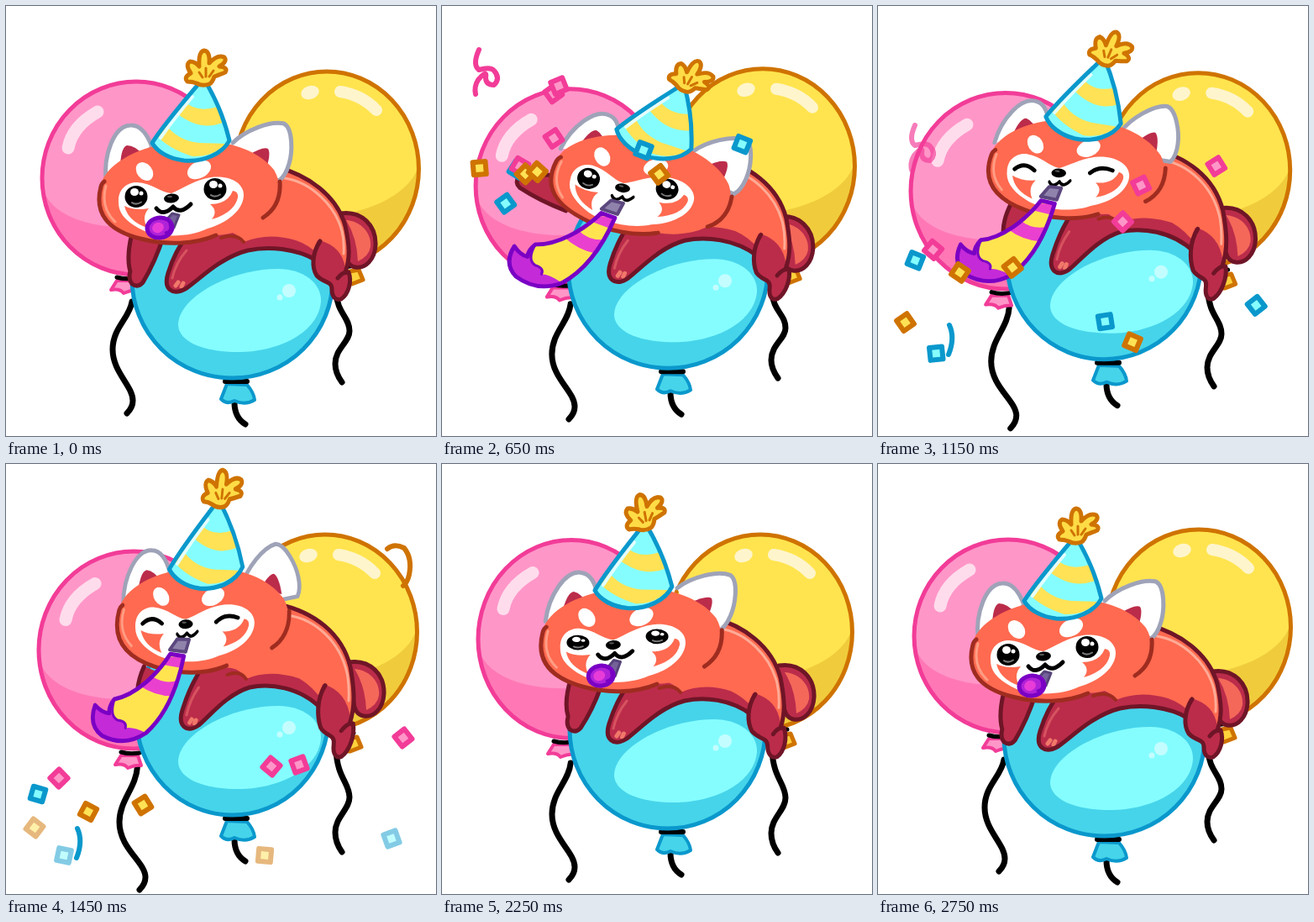
An HTML page for the animation above (2800 ms loop, 512 px wide and 512 px high).

```html
<!DOCTYPE html>
<html lang="en">
<head>
<meta charset="utf-8">
<title>Party panda</title>
<style>
html, body { margin: 0; width: 100%; height: 100%; overflow: hidden; background: #fff; }
svg { display: block; width: 100vw; height: 100vh; }
</style>
</head>
<body>
<svg id="stage" viewBox="0 0 512 512" fill="none" stroke-linecap="round" stroke-linejoin="round"></svg>
<script>
const LOOP = 2800, STEP = 50;
const stage = document.getElementById('stage');
const C = {
  orange: '#ff6a50', brown: '#9f2c20', dark: '#bb2c4a', maroon: '#6f1527',
  pink: '#ff96c8', pinkLine: '#f23c98', gold: '#ffe44f', goldLine: '#cf7300',
  blue: '#46d4ea', blueLine: '#0a98cc', ice: '#85fdff', grey: '#9fa3b8',
  violet: '#7a00c4', purple: '#b022d8'
};

const clamp = (v, a = 0, b = 1) => Math.min(b, Math.max(a, v));

// Monotone cubic through the keys
function curve(t, T, V) {
  const n = T.length - 1;
  if (t <= T[0]) return V[0];
  if (t >= T[n]) return V[n];
  let i = 0;
  while (t >= T[i + 1]) i++;
  const slope = k => (V[k + 1] - V[k]) / (T[k + 1] - T[k]);
  const tangent = k => {
    if (k === 0 || k === n) return 0;
    const a = slope(k - 1), b = slope(k);
    return a * b <= 0 ? 0 : 2 * a * b / (a + b);
  };
  const h = T[i + 1] - T[i], u = (t - T[i]) / h, u2 = u * u, u3 = u2 * u;
  return V[i] * (2 * u3 - 3 * u2 + 1) + tangent(i) * h * (u3 - 2 * u2 + u)
    + V[i + 1] * (3 * u2 - 2 * u3) + tangent(i + 1) * h * (u3 - u2);
}

const path = (d, fill, line, w = 5) =>
  `<path d="${d}" fill="${fill || 'none'}"${line ? ` stroke="${line}" stroke-width="${w}"` : ''}/>`;
const oval = (x, y, rx, ry, fill, turn = 0, line = '', w = 5) =>
  `<ellipse cx="${x}" cy="${y}" rx="${rx}" ry="${ry}" fill="${fill}" transform="rotate(${turn} ${x} ${y})"${line ? ` stroke="${line}" stroke-width="${w}"` : ''}/>`;
const group = (tf, s) => `<g transform="${tf}">${s}</g>`;
const move = (x, y, s) => group(`translate(${x} ${y})`, s);
const warp = (d, f) => d.replace(/(-?[\d.]+) (-?[\d.]+)/g, (m, x, y) => f(+x, +y).map(v => v.toFixed(2)).join(' '));

const KEYS = [0, 400, 850, 1450, 1850, 2250, 2750];
const POSE = [0, 400, 850, 1100, 1450, 1650, 1850, 2250, 2750];
const ARM = [0, 150, 400, 850, 1100, 1450, 1850, 2250, 2750];

function balloon(cx, cy, rx, ry, fill, shade, line, left, right) {
  const edge = y => rx * Math.sqrt(1 - (y / ry) ** 2);
  const x0 = cx - edge(left), x1 = cx + edge(right);
  const crescent = `M${x0} ${cy + left}A${rx} ${ry} 0 0 0 ${x1} ${cy + right}` +
    `C${cx + rx * .8} ${cy + 66} ${cx - rx * .8} ${cy + 82} ${x0} ${cy + left}Z`;
  return oval(cx, cy, rx, ry, fill) + path(crescent, shade) + oval(cx, cy, rx, ry, 'none', 0, line);
}

function pinkBalloon(at) {
  const cx = at(155, 153, 152, 152, 152, 154), cy = at(205, 209.5, 217.5, 221.5, 216, 208.5);
  const rx = at(112, 111, 113, 113, 111, 111), ry = at(115, 115, 116, 117.5, 118, 118);
  const kx = at(140, 139, 141, 145, 146, 141), ky = at(323, 326, 336, 343, 339, 330);
  const ex = at(0, 2, 11, 15, 12, 7), ey = at(0, 3, 11, 22, 20, 10), lx = at(0, 0, 7, 8, 8, 4);
  const string = `M${150 + lx * .8} ${352 + ey * .4}C${147 + lx} ${372 + ey * .6} ${127 + lx} ${383 + ey * .8} ${127 + lx} ${409 + ey * .8}` +
    `C${127 + lx} ${436 + ey} ${151 + ex} ${452 + ey} ${151 + ex} ${470 + ey}Q${151 + ex} ${478 + ey} ${144 + ex} ${485 + ey}`;
  return path(string, '', '#000', 7)
    + balloon(cx, cy, rx, ry, C.pink, '#ff78b5', C.pinkLine, 12, 12)
    + move(kx, ky, path('M-8 4L-15 15Q-4 13 0 19Q10 15 16 16L12 4Z', C.pink, C.pinkLine, 4) + path('M-8 0Q2 3 14 1', '', '#000', 5))
    + move(cx - 155, cy - 205, path('M74 169Q79 143 109 126', '', '#ffdcec', 15));
}

function yellowBalloon(at) {
  const cx = at(382, 382, 382, 380, 379, 379), cy = at(194, 190, 192, 200, 204, 200);
  const s = at(0, -6, -3, 14, 20, 15);
  const kx = at(414, 414, 416, 412, 408, 409), ky = at(322, 320, 322, 333, 337, 329);
  const string = `M393 340C394 ${366 + s * .5} 409 ${370 + s * .7} 409 ${387 + s * .7}` +
    `C409 ${400 + s * .8} 392 ${408 + s * .9} 392 ${426 + s * .9}Q392 ${437 + s} 400 ${448 + s}`;
  return path(string, '', '#000', 7)
    + balloon(cx, cy, 109.5, 116, C.gold, '#f0cc3c', C.goldLine, 10, -4)
    + move(kx, ky, path('M-10 -5L6 -8L11 4L-2 9L-13 9Z', '#ffd23c', C.goldLine) + path('M-12 -11L2 -13', '', '#000', 5))
    + move(cx - 382, cy - 194, oval(362, 103, 11, 8, '#fff5cc', -18) + path('M398 102Q424 106 441 124', '', '#fff5cc', 14));
}

function blueBalloon(at, b) {
  const left = at(148, 148, 149, 153, 151, 150), right = at(391, 391, 389, 386, 386, 387);
  const cx = (left + right) / 2, rx = (right - left) / 2 - 2;
  return move(0, b,
    path('M272 472Q272 490 285 498', '', '#000', 7)
    + path('M263 450L256 468Q263 475 272 470Q285 476 296 469Q295 460 287 451Z', C.blue, C.blueLine, 4)
    + path('M261 447H287', '', '#000', 6))
    + oval(cx, 325 + b, rx, 118, C.blue, 0, C.blueLine)
    + move(0, b, path('M205 379C206 346 268 313 324 313C354 313 376 330 375 352C372 388 326 412 276 412C236 412 205 400 205 379Z', C.ice)
      + oval(337, 339, 8, 8, '#c4fdff') + oval(326, 347, 3.5, 3.5, '#c4fdff'));
}

function tail(at) {
  const x = at(0, -6, 8, 10, -10, 3), y = at(0, 6, 1, -11, -2, -7);
  return move(x, y, path('M398 247C424 243 441 262 440 285C439 302 428 313 416 311C406 309 400 298 402 284Z', C.dark)
    + path('M405 255C422 256 436 270 434 287Q432 298 419 304Q418 276 405 255Z', '#f4685a')
    + path('M398 247C424 243 441 262 440 285C439 302 428 313 416 311C408 310 404 302 404 294', '', C.maroon));
}

function backArm(t) {
  const k = v => curve(t, ARM, v);
  const x = k([170, 168, 150, 158, 175, 182, 180, 172, 170]), y = k([270, 266, 226, 228, 240, 248, 250, 260, 270]);
  const tx = k([154, 150, 88, 95, 150, 162, 163, 156, 154]), ty = k([332, 325, 182, 242, 290, 298, 302, 317, 332]);
  const len = Math.hypot(tx - x, ty - y), a = Math.atan2(ty - y, tx - x) * 180 / Math.PI;
  return group(`translate(${x} ${y}) rotate(${a})`,
    path(`M0 -18Q${len * .5} -16 ${len - 5} -8Q${len + 3} -4 ${len} 4Q${len - 4} 10 ${len - 14} 10Q${len * .5} 20 0 19`, C.dark, C.maroon));
}

function body(at, b) {
  const ax = at(0, 3, 11, 17, 13, 6), bx = at(0, 3, 7, 6, 3, -1);
  const bend = (x, y) => {
    const side = clamp((x - 340) / 30), lift = 1 - side + side * clamp((352 - y) / 110);
    return [x + ax * clamp((300 - x) / 100) + bx * clamp((x - 300) / 60) * clamp((352 - y) / 40), y + b * lift];
  };
  const draw = (d, ...style) => path(warp(d, bend), ...style);
  const under = 'C345 288 312 286 288 291C256 299 232 324 215 336C198 346 187 337 193 318C198 302 204 288 222 264';
  return draw('M300 188C352 196 394 226 404 262C409 285 410 300 404 318L370 303' + under + 'Z', C.orange)
    + draw('M222 264L262 268Q276 270 283 281Q312 269 345 279Q360 284 372 296L370 303' + under + 'Z', C.dark)
    + draw('M256 276Q274 270 283 281', '', C.brown, 4)
    + draw('M198 324Q202 306 215 291', '', '#d6535f', 3)
    + draw('M202 333L205 329M209 334L211 330', '', '#f0786a', 5)
    + draw('M370 303' + under, '', C.maroon)
    + draw('M332 205C364 210 392 238 400 268Q403 280 402 295', '', '#ffab96', 3)
    + draw('M371 279C363 295 363 312 370 321C378 330 388 327 388 337C388 347 393 351 399 349C408 343 412 328 408 316L404 312Q400 286 373 279Z', C.dark)
    + draw('M322 192C360 201 394 226 404 262C409 285 410 300 404 317', '', C.maroon)
    + draw('M374 280C364 295 364 312 370 321C378 330 388 327 388 337C388 347 393 351 399 349C408 343 412 328 408 317Q401 316 395 324', '', C.maroon);
}

function eye(x, y, open) {
  if (open < .3) return '';
  const ry = 13 * open;
  return oval(x, y, 13.5, ry, '#000') + oval(x - 2, y - ry * .42, 5, 4.5 * open, '#fff')
    + oval(x + 6, y - ry * .3, 2.5, 2.5 * open, '#fff')
    + path(`M${x - 5} ${y + ry * .55}Q${x} ${y + ry * .8} ${x + 6} ${y + ry * .5}`, '', '#777', 2);
}

function face(t, ext) {
  const open = curve(t, [0, 600, 850, 1000, 2100, 2250, 2400], [1, 1, .82, 0, 0, .68, 1]);
  const shut = open < .3 ? path('M143 230Q154 219 167 229M235 225Q246 214 262 219', '', '#000') : '';
  const mouth = path('M179 241Q187 251 199 239Q207 249 220 236', '', '#000');
  return path('M134 234C133 218 144 210 156 210C174 211 184 222 197 223C210 218 224 207 244 204C268 201 284 212 283 226C282 244 262 259 240 265C222 274 190 277 165 268C145 259 134 248 134 234Z', '#fff')
    + path('M141 238Q153 244 170 241Q161 251 168 264Q145 256 141 238Z', C.orange)
    + path('M243 236Q264 236 270 220Q277 221 276 228Q272 246 245 254Q253 244 243 236Z', C.orange)
    + oval(165, 197, 9, 12, '#fff', -38) + oval(230, 195, 15, 10, '#fff', -28)
    + eye(155, 227, open) + eye(249, 218, open) + shut
    + oval(197, 229, 9, 5.5, '#000', -5) + oval(195, 227, 3, 1.2, '#555')
    + (ext > .3 ? group('translate(199 241) scale(.62 .8) translate(-199 -241)', mouth) : mouth);
}

function horn(ext, drop) {
  if (ext < .3) {
    return path(`M198 247L206 249L200 ${264 + drop}L186 ${260 + drop}Z`, '#75629a', '#56447a', 3)
      + move(0, drop, oval(183, 264, 15, 12, C.purple, -8, C.violet)
      + oval(181, 264, 7, 6, '#e83cd8', -20) + path('M190 270Q198 268 195 259', '', C.violet, 3));
  }
  const tip = 'Q104 330 105 338Q96 338 87 329Q79 353 97 365Q126 378 152 360';
  const shell = 'M179 265C163 291 136 316 111 321' + tip + 'Q185 330 196 267Z';
  return group(`translate(188 262) scale(${ext}) translate(-188 -262)`,
    path(shell, C.gold)
    + path('M157 292Q172 302 190 296L184 315Q162 316 142 304ZM176 269L196 267L193 281L170 278Z', '#ea40d0')
    + path('M111 321' + tip + 'Q136 353 126 355Q128 347 116 346Q106 344 111 321Z', '#c42ad8')
    + path('M126 355Q128 347 116 346Q106 342 110 325', '', C.violet, 3)
    + path(shell, '', C.violet))
    + path('M187 247L202 247L198 262L178 260Z', '#8f83ac', '#5c477e', 4);
}

function hat(at) {
  const turn = at(0, 2.6, 4, -1.5, -.5, -2), tall = at(1, 1, 1.02, 1.08, 1.06, 1.03), swing = at(0, 0, 22, 6, -6, -10);
  const cone = 'M174 163C190 138 220 104 235 86C250 110 260 135 266 160C258 176 235 186 212 184C195 182 180 174 174 163Z';
  const bow = path('M227 92Q222 90 216 90Q211 85 220 80Q213 70 219 66Q225 66 230 72Q229 54 236 53Q243 54 242 68Q252 57 260 61Q264 66 254 72Q265 73 261 79Q254 82 248 84Q246 91 242 93Q234 96 227 92Z', '#ffdc46', C.goldLine)
    + path('M230 79L234 85M238 74L238 84M247 77L242 84', '', C.goldLine, 3);
  return group(`translate(220 165) rotate(${turn}) scale(1 ${tall}) translate(-220 -165)`,
    path(cone, C.ice)
    + path('M211 112Q226 128 252 120L258 139Q230 150 201 126ZM190 141Q204 160 230 163L262 164Q246 180 222 179Q194 170 180 155Z', '#ffe255')
    + path('M184 157Q200 134 222 108', '', '#e4ffff', 4)
    + path(cone, '', C.blueLine)
    + group(`rotate(${swing} 234 92)`, bow));
}

function head(t, at) {
  const k = v => curve(t, POSE, v);
  const x = k([202, 219, 222, 221, 219, 218, 216, 209, 202]), y = k([222.5, 213.5, 210, 195, 184.5, 182, 190.5, 209, 222.5]);
  const turn = k([0, 13, 13, 7, 2, 2, 2, 1, 0]);
  const sx = at(1, 1, 1, .95, .97, 1), sy = at(1, 1, .94, 1, 1, 1), drop = at(0, 0, 0, 4, 8, 2);
  const ext = curve(t, [500, 650, 1600, 1750], [0, 1, 1, 0]);
  const earL = at(0, 8, 24, 4, -3, 12), earR = at(0, -16, 2, -31, -14, 6);
  // The chin sinks while the brow stays put
  const chin = d => warp(d, (px, py) => [px, py + drop * clamp((py - 235) / 45)]);
  return group(`translate(${x} ${y}) rotate(${turn}) scale(${sx} ${sy}) translate(-202 -222.5)`,
    group(`rotate(${earL} 145 190)`,
      path('M119 208C116 178 128 143 148 142C160 141 168 152 174 168L150 192', '#fff', C.grey)
      + path('M136 190Q137 168 144 166Q154 166 164 178Z', C.dark))
    + group(`rotate(${earR} 300 180)`,
      path('M270 163C285 148 315 136 331 140C342 146 341 175 337 188Q333 202 325 208L288 196', '#fff', C.grey)
      + path('M288 178Q306 167 312 170Q316 176 309 196Z', C.dark))
    + path(chin('M113 212C120 190 150 170 195 163C250 154 298 168 319 195C331 215 325 238 306 252C290 265 270 272 250 273C225 284 190 285 160 277C125 268 104 250 113 212Z'), C.orange)
    + path('M119 214Q112 240 130 257', '', '#ff9d84', 3)
    + path(chin('M117 209Q114 211 113 215C104 250 125 268 160 277C190 285 225 284 250 273M326 209Q328 238 306 252'), '', C.brown)
    + face(t, ext) + hat(at) + horn(ext, drop));
}

const PAPER = [[C.ice, C.blueLine], ['#ffe255', C.goldLine], [C.pink, C.pinkLine]];
// colour, x and y at 400, 850 and 1450 ms
const FIRST = [
  [1, 78, 136, 31, 307, 34, 433], [0, 88, 177, 70, 349, 69, 466],
  [1, 177, 143, 290, 318, 308, 466], [0, 193, 131, 427, 253, 459, 446],
  [0, 166, 120, 266, 284, 272, 450]
];
// colour, x and y at 850 and 1450 ms
const SECOND = [
  [0, 57, 211, 38, 393], [2, 71, 205, 63, 374], [1, 97, 219, 98, 414], [1, 154, 215, 163, 406],
  [2, 244, 152, 316, 360], [2, 248, 67, 349, 358], [2, 286, 53, 473, 326]
];

const scrap = (x, y, turn, c, fade) =>
  `<rect x="-7.5" y="-7.5" width="15" height="15" transform="translate(${x} ${y}) rotate(${turn})" fill="${PAPER[c][0]}" stroke="${PAPER[c][1]}" stroke-width="6" opacity="${fade}"/>`;

function confetti(t) {
  let s = '';
  if (t >= 300 && t < 1550) {
    const fade = clamp((1550 - t) / 200);
    FIRST.forEach(([c, x0, y0, x1, y1, x2, y2], i) => {
      const x = curve(t, [300, 400, 850, 1450, 1550], [92, x0, x1, x2, x2]);
      const y = curve(t, [300, 400, 480, 850, 1450, 1550], [182, y0, y0 - 10, y1, y2, y2 + 20]);
      s += scrap(x, y, 10 + i * 29 + (t - 400) * .06 * (i % 2 ? 1 : -1), c, i === 4 ? clamp((1400 - t) / 200) : fade);
    });
  }
  if (t >= 550 && t < 1750) {
    const fade = clamp((1750 - t) / 200);
    SECOND.forEach(([c, x1, y1, x2, y2], i) => {
      const x = curve(t, [550, 850, 1450, 1750], [100, x1, x2, x2 + (x2 - x1) * .1]);
      const y = curve(t, [550, 720, 850, 1450, 1750], [215, y1 - 28, y1, y2, y2 + 60]);
      s += scrap(x, y, 28 + i * 6 + (t - 850) * .02 * (i % 2 ? 1 : -1), c, fade);
    });
  }
  const ribbon = (d, line, from, to, fall, zero) => {
    if (t < from || t >= to) return;
    s += `<g opacity="${clamp((to - t) / 150)}">${move(0, (t - zero) * fall, path(d, '', line, 6))}</g>`;
  };
  ribbon('M44 88Q36 106 44 112Q58 108 62 113Q70 122 62 130Q52 130 52 121Q54 111 43 124Q38 132 40 141', C.pinkLine, 650, 1250, .18, 850);
  ribbon('M454 101Q462 94 474 100Q484 112 480 132Q478 141 473 145', C.goldLine, 1250, 1700, .2, 1450);
  ribbon('M85 434Q92 449 84 469', C.blueLine, 1100, 1650, .18, 1450);
  return s;
}

function draw(t) {
  const at = (...v) => curve(t, KEYS, [...v, v[0]]);
  const b = at(0, -5, -17, -25, -19, -9);
  stage.innerHTML = pinkBalloon(at) + yellowBalloon(at) + blueBalloon(at, b)
    + tail(at) + backArm(t) + body(at, b) + head(t, at) + confetti(t);
}

const start = performance.now();
let last = -1;
function tick() {
  const t = Math.floor((performance.now() - start) % LOOP / STEP) * STEP;
  if (t !== last) draw(last = t);
  requestAnimationFrame(tick);
}
tick();
</script>
</body>
</html>
```
